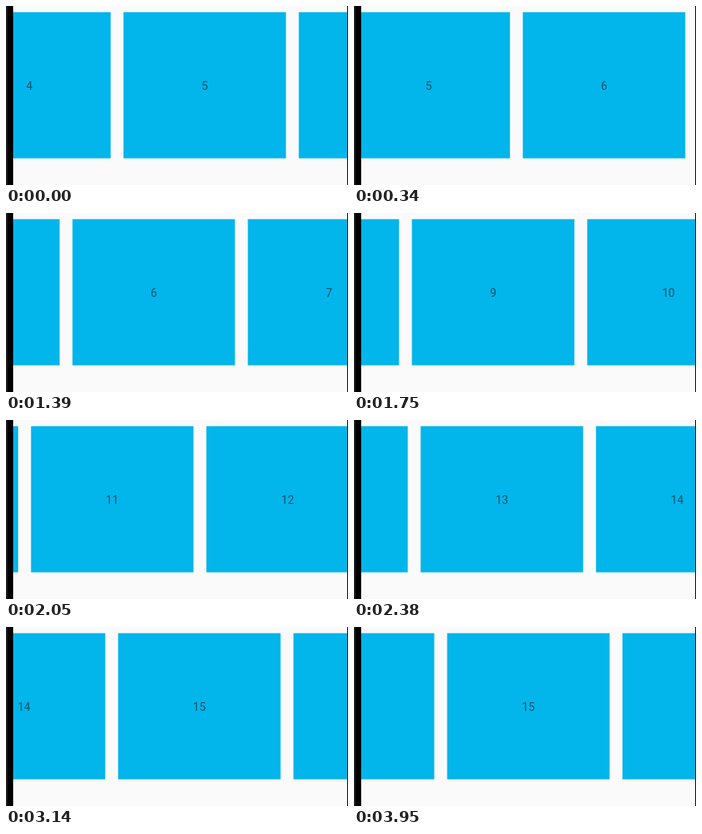
Animation, 428 px wide and 224 px high, one loop 4490 ms. Source, as an HTML page with a canvas:

```html
<!DOCTYPE html>
<html lang="en">
<head>
<meta charset="utf-8">
<title>Snapping card row</title>
<style>
html, body { margin: 0; width: 100%; height: 100%; overflow: hidden; background: #fafafa; }
canvas { display: block; }
</style>
</head>
<body>
<canvas id="stage" width="428" height="224"></canvas>
<script>
const ctx = document.getElementById('stage').getContext('2d');
const LOOP = 4490, STEP = 58;
const PITCH = 219.4, CARD_W = 203.3, CARD_TOP = 7.7, CARD_H = 182.9, CENTER = 218.2;

// Scroll knots: time in steps, centred page, pages per step.
const knots = [
  [0, 4.861, 0.175],
  [13, 6, 0],
  [21.3, 6, 0],
  [26.3, 7.306, 0.52],
  [30, 9.201, 0.503],
  [41, 13.151, 0.2156],
  [58.15, 15, 0]
];

function pageAt(step) {
  const next = knots.findIndex(k => k[0] > step);
  if (next < 0) return knots[knots.length - 1][1];
  const [t0, p0, v0] = knots[next - 1];
  const [t1, p1, v1] = knots[next];
  const d = t1 - t0, u = (step - t0) / d, w = 1 - u;
  return w * w * ((1 + 2 * u) * p0 + u * d * v0)
       + u * u * ((3 - 2 * u) * p1 - w * d * v1);
}

function rect(color, x, y, w, h) {
  ctx.fillStyle = color;
  ctx.fillRect(x, y, w, h);
}

function draw(time) {
  const page = pageAt(Math.floor((time % LOOP + 0.5) / STEP));
  rect('#fafafa', 0, 0, 428, 224);
  ctx.font = '14px Roboto, sans-serif';
  ctx.textAlign = 'center';
  const first = Math.floor(page) - 1;
  for (let n = first; n <= first + 3; n++) {
    const x = CENTER + (n - page) * PITCH;
    rect('#02b5ea', x - CARD_W / 2, CARD_TOP, CARD_W, CARD_H);
    ctx.fillStyle = 'rgba(0, 0, 0, 0.54)';
    ctx.fillText(n, x, 105);
  }
  rect('#000', 0, 0, 9, 224);
  rect('#1c1c1c', 0, 0, 2, 224);
  rect('#000', 427, 0, 1, 224);
}

const start = performance.now();
function tick() {
  draw(performance.now() - start);
  requestAnimationFrame(tick);
}
tick();
</script>
</body>
</html>
```
